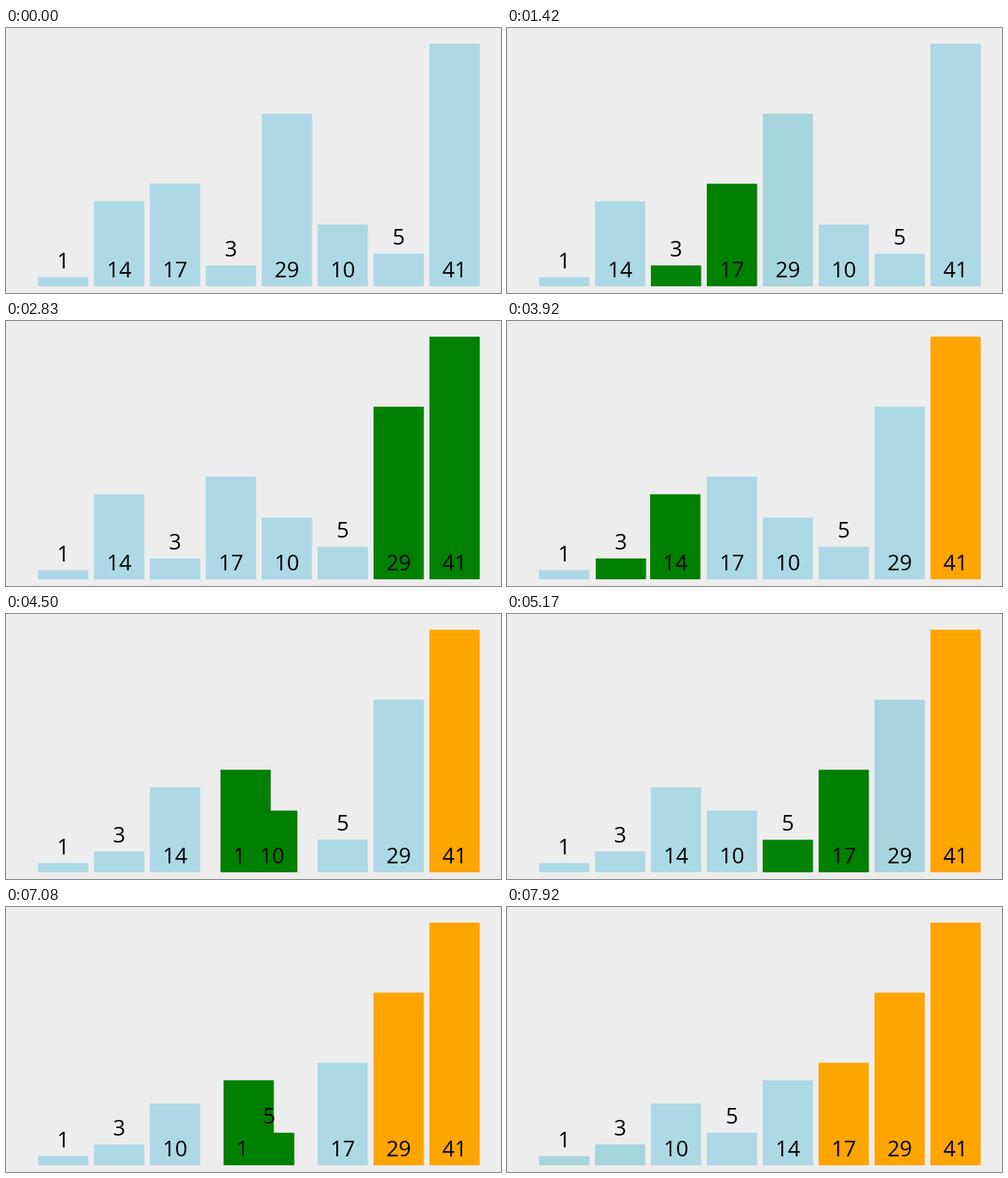
These frames come from a looping animation (664x356 px, 8000 ms). An HTML page:

```html
<!DOCTYPE html>
<html lang="en">
<head>
<meta charset="utf-8">
<title>Bubble sort</title>
<style>
  html, body { margin: 0; width: 100%; height: 100%; overflow: hidden; background: #ededed; }
  svg { display: block; width: 664px; height: 356px; }
  text { font: 29px "Open Sans", "Noto Sans", sans-serif; text-anchor: middle; fill: #000; }
</style>
</head>
<body>
<svg id="chart" viewBox="0 0 664 356"></svg>
<script>
const LOOP = 8000, STEP = 1000 / 12;
const FADE = 250, COMPARE = 254, MOVE = 221;
const PASS_STARTS = [420, 3222, 5800, 7903];
const VALUES = [1, 14, 17, 3, 29, 10, 5, 41];
const BLUE = [173, 216, 230], GREEN = [0, 128, 0], ORANGE = [255, 165, 0];
const FLOOR = 347, WIDTH = 67.5;
const slotX = i => 43 + 75 * i;

// The CSS "ease" curve, cubic-bezier(.25, .1, .25, 1)
const bezier = (a, b, u) => 3 * a * u * (1 - u) ** 2 + 3 * b * u * u * (1 - u) + u ** 3;
function ease(p) {
  if (p <= 0 || p >= 1) return p <= 0 ? 0 : 1;
  let lo = 0, hi = 1;
  for (let i = 0; i < 24; i++) {
    const mid = (lo + hi) / 2;
    if (bezier(.25, .25, mid) < p) lo = mid; else hi = mid;
  }
  return bezier(.1, 1, lo);
}

// A track is a list of [time, value] entries, each eased in from the one before
function push(track, time, value) {
  if (track[track.length - 1][1] !== value) track.push([time, value]);
}
function sample(track, time, duration) {
  let i = track.length - 1;
  while (i > 0 && track[i][0] > time) i--;
  const [start, to] = track[i];
  if (i === 0) return to;
  const from = track[i - 1][1], k = ease((time - start) / duration);
  return to.map((v, n) => from[n] + (v - from[n]) * k);
}

const svg = document.getElementById('chart');
function add(parent, tag, attrs) {
  const el = document.createElementNS('http://www.w3.org/2000/svg', tag);
  for (const name in attrs) el.setAttribute(name, attrs[name]);
  return parent.appendChild(el);
}

function makeBar(value, slot) {
  const height = 4.5 + 7.84 * value, top = FLOOR - height;
  const group = add(svg, 'g', {});
  const rect = add(group, 'rect', { y: top, width: WIDTH, height });
  const y = height < 60 ? top - 12 : 335;
  add(group, 'text', { x: WIDTH / 2, y }).textContent = value;
  return { value, group, rect, color: [[0, BLUE]], x: [[0, [slotX(slot)]]] };
}

const bars = VALUES.map(makeBar);
// Smaller bars pass in front of larger ones
[...bars].sort((a, b) => b.value - a.value).forEach(bar => svg.append(bar.group));

function record() {
  const row = [...bars];
  PASS_STARTS.forEach((start, pass) => {
    const last = row.length - 1 - pass;
    let time = start;
    for (let j = 0; j < last && time < LOOP; j++) {
      if (j > 0) push(row[j - 1].color, time, BLUE);
      push(row[j].color, time, GREEN);
      push(row[j + 1].color, time, GREEN);
      time += COMPARE;
      if (row[j].value > row[j + 1].value) {
        [row[j], row[j + 1]] = [row[j + 1], row[j]];
        push(row[j].x, time, [slotX(j)]);
        push(row[j + 1].x, time, [slotX(j + 1)]);
        time += MOVE;
      }
    }
    if (time < LOOP) {
      push(row[last - 1].color, time, BLUE);
      push(row[last].color, time, ORANGE);
    }
  });
}

function draw(now) {
  // The picture advances in twelve steps per second
  const time = Math.floor((now % LOOP + 4) / STEP) * STEP % LOOP;
  for (const bar of bars) {
    const rgb = sample(bar.color, time, FADE).map(Math.round);
    bar.rect.setAttribute('fill', `rgb(${rgb})`);
    bar.group.setAttribute('transform', `translate(${sample(bar.x, time, MOVE)[0]})`);
  }
}

record();
const origin = performance.now();
function tick() {
  draw(performance.now() - origin);
  requestAnimationFrame(tick);
}
tick();
</script>
</body>
</html>
```
